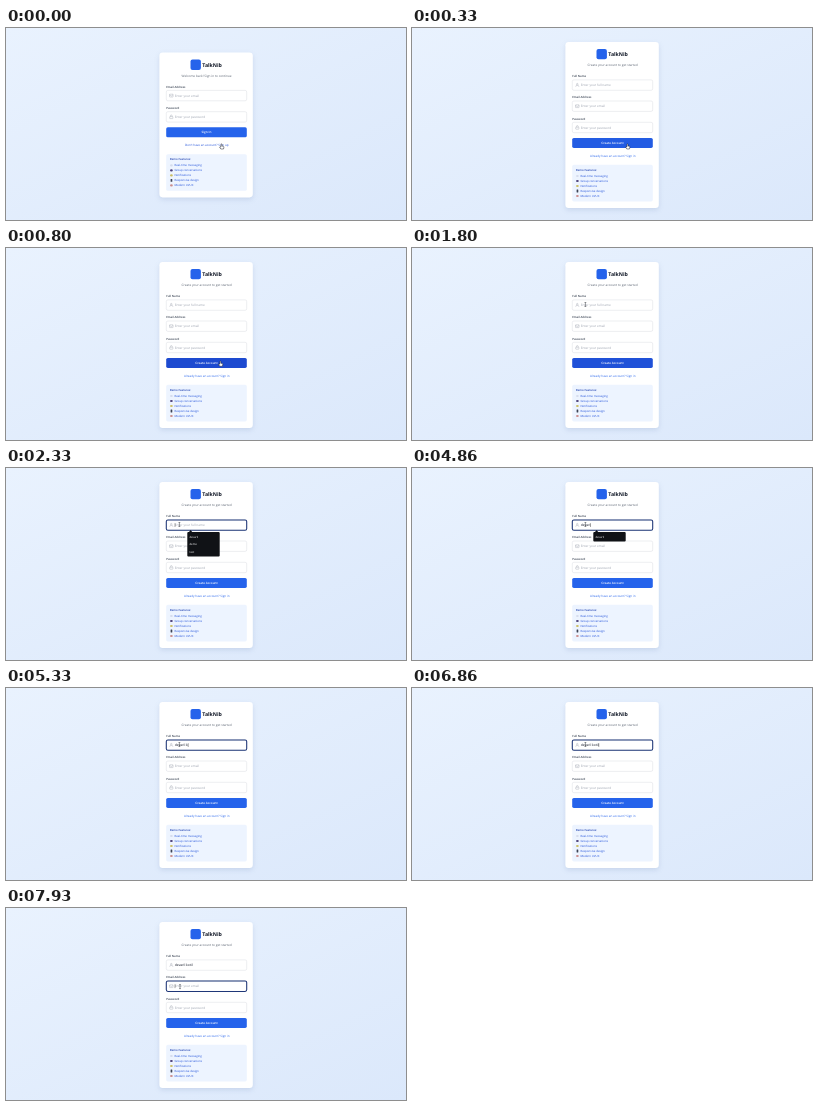
Write an HTML page that moves like this. It is 400 px wide and 192 px high and loops after 8000 ms.

```html
<!DOCTYPE html>
<html lang="en">
<head>
<meta charset="utf-8">
<title>Sign up form</title>
<style>
  html, body { margin: 0; width: 100%; height: 100%; overflow: hidden; }
  body { background: linear-gradient(to bottom right, #e9f2fe, #dbe8fb); }
  svg { display: block; width: 100vw; height: 100vh; }
  text { font-family: "Open Sans", "Noto Sans", sans-serif; text-rendering: geometricPrecision; white-space: pre; }
  .mid { text-anchor: middle; }
  .brand { font-size: 5.2px; font-weight: 700; fill: #111827; }
  .sub { font-size: 3.15px; fill: #5b6472; }
  .label { font-size: 2.85px; font-weight: 600; fill: #374151; }
  .hint { font-size: 3.15px; fill: #9ca3af; }
  .typed { font-size: 3.35px; fill: #111827; }
  .go { font-size: 3.05px; font-weight: 600; fill: #fff; }
  .link { font-size: 3px; font-weight: 500; }
  .head { font-size: 2.8px; font-weight: 600; fill: #1e40af; }
  .item { font-size: 2.85px; fill: #1d4ed8; }
  .option { font-size: 2.8px; fill: #fff; }
  .box { fill: #fff; stroke: #d1d5db; stroke-width: .4; }
  .ring { fill: none; stroke: #1f3778; stroke-width: 1.05; }
  .icon { fill: none; stroke: #9ca3af; stroke-width: .4; }
  #card { filter: drop-shadow(0 2.6px 2.6px rgba(40, 70, 130, .13)); }
</style>
</head>
<body>
<svg viewBox="0 0 400 192" preserveAspectRatio="none">
  <rect id="card" x="153.4" width="93.4" rx="3.3" fill="#fff"/>

  <g id="top">
    <rect x="184.5" y="20.9" width="10.4" height="10.4" rx="2" fill="#2563eb"/>
    <text class="brand" x="196.3" y="28.1">TalkNib</text>
    <text class="sub mid" id="sub" x="200.6" y="38"></text>
  </g>

  <g id="name"></g>

  <g id="lower">
    <g id="email"></g>
    <g id="password"></g>
    <rect id="button" x="160.2" y="109.9" width="80.6" height="10" rx="1.6"/>
    <text class="go mid" id="go" x="200.5" y="116"></text>
    <text class="link mid" id="link" x="200.8" y="128.5"></text>
    <g id="features">
      <rect x="160.2" y="136.8" width="80.6" height="36.6" rx="1.6" fill="#edf4ff"/>
      <text class="head" x="163.7" y="143.1">Demo Features:</text>
    </g>
  </g>

  <g id="popup">
    <path d="M182.6 64.4l2-2.3 2 2.3z" fill="#101216"/>
    <rect id="panel" x="181.3" y="64" width="32.4" rx="1" fill="#101216"/>
    <text class="option" x="183.4" y="69.8">devaril</text>
    <g id="more">
      <text class="option" x="183.4" y="77.3">demo</text>
      <text class="option" x="183.4" y="84.8">test</text>
    </g>
  </g>

  <g id="cursor" stroke-linejoin="round">
    <path id="hand" d="M-.5 .2Q0-.4 .5 .2V2L2 2.4Q2.5 2.6 2.4 3.2L2 5H-.7L-1.9 3.1Q-1.7 2.4-.5 3z"
          fill="#fff" stroke="#1b1d24" stroke-width=".5"/>
    <path id="beam" d="M-.9-2H.9M0-2V2M-.9 2H.9" fill="none" stroke="#33363d" stroke-width=".5"/>
    <path id="arrow" d="M0 0V4L1 3.1 1.7 4.6 2.3 4.3 1.7 2.9H3z" fill="#fff" stroke="#1b1d24" stroke-width=".4"/>
  </g>
</svg>
<script>
const $ = id => document.getElementById(id);
const LOOP = 8000, SWITCH = 260, SHIFT = 10.6;
const FULL = "devaril kotil";
// time at which each letter is typed
const KEYS = [2860, 3060, 3460, 3930, 4130, 4860, 5000, 5130, 5330, 5730, 5900, 6060, 6600];
// mouse stops: time, x, y
const PATH = [[0, 215.5, 116], [300, 215.5, 116], [750, 214.4, 113.2], [1710, 214.4, 113.2],
  [1795, 173.4, 56.5], [7240, 173.4, 56.5], [7460, 173.4, 78.2], [7900, 173.4, 78.2], [7930, 174, 78.6]];

const ICONS = {
  name: y => `<circle cx="165.3" cy="${y - .9}" r=".8"/><path d="M163.8 ${y + 1.7}v-.4q0-1 1-1h1q1 0 1 1v.4"/>`,
  email: y => `<rect x="163.5" y="${y - 1.4}" width="3.6" height="2.8" rx=".4"/><path d="M163.5 ${y - .8}l1.8 1.2 1.8-1.2"/>`,
  password: y => `<rect x="163.7" y="${y - .3}" width="3.2" height="2" rx=".4"/><path d="M164.4 ${y - .3}v-.7a.9.9 0 0 1 1.8 0v.7"/>`
};

function field(id, label, hint, y) {
  const frame = `x="160.3" y="${y - 5.2}" width="80.4" height="10.4" rx="1.6"`;
  $(id).innerHTML = `<text class="label" x="160.2" y="${y - 7.9}">${label}</text>
    <rect class="box" ${frame}/><rect class="ring" ${frame} opacity="0"/>
    <g class="icon">${ICONS[id](y)}</g>
    <text class="hint" x="168.8" y="${y + 1.1}">${hint}</text>
    <text class="typed" x="168.8" y="${y + 1.1}"></text>
    <rect class="caret" x="168.8" y="${y - 1.9}" width=".4" height="3.8" fill="#222" opacity="0"/>`;
}
field("name", "Full Name", "Enter your full name", 57.1);
field("email", "Email Address", "Enter your email", 78.2);
field("password", "Password", "Enter your password", 99.5);

const FEATURES = [
  ["Real-time messaging", "#d5dcec"], ["Group conversations", "#4a3f78"], ["Notifications", "#cbbd62"],
  ["Responsive design", "#3d4354"], ["Modern UI/UX", "#cc8d8d"]
];
$("features").innerHTML += FEATURES.map(([label, color], i) => {
  const y = 148 + i * 5;
  const shape = i === 3
    ? `<rect x="164.6" y="${y - 1.4}" width="1.7" height="2.8" rx=".3" fill="${color}"/>`
    : `<ellipse cx="165.4" cy="${y}" rx="1.4" ry="1.1" fill="${color}"/>`;
  return `${shape}<text class="item" x="168.4" y="${y + 1}">${label}</text>`;
}).join("");

const clamp = v => Math.max(0, Math.min(1, v));
const ramp = (t, from, ms) => { const p = clamp((t - from) / ms); return p * p * (3 - 2 * p); };
const show = (id, on) => $(id).setAttribute("visibility", on ? "visible" : "hidden");
const part = (id, cls) => document.querySelector(`#${id} .${cls}`);
const mix = (a, b, p) => `rgb(${a.map((v, i) => Math.round(v + (b[i] - v) * p))})`;

function mouse(t) {
  const i = Math.max(0, PATH.findLastIndex(stop => stop[0] <= t));
  const a = PATH[i], b = PATH[i + 1] || a;
  const p = ramp(t, a[0], b[0] - a[0] || 1);
  return [a[1] + (b[1] - a[1]) * p, a[2] + (b[2] - a[2]) * p];
}

function drawForm(t) {
  const joined = t >= SWITCH, inset = joined ? 0 : SHIFT;
  $("card").setAttribute("y", 14 + inset);
  $("card").setAttribute("height", 166 - 2 * inset);
  $("top").setAttribute("transform", `translate(0 ${inset})`);
  $("lower").setAttribute("transform", `translate(0 ${-inset})`);
  $("name").style.display = joined ? "" : "none";
  $("sub").textContent = joined ? "Create your account to get started" : "Welcome back! Sign in to continue";
  $("go").textContent = joined ? "Create Account" : "Sign In";
  $("link").textContent = joined ? "Already have an account? Sign in" : "Don't have an account? Sign up";
  $("link").setAttribute("fill", joined ? "#2563eb" : "#1d4ed8");
  const hover = ramp(t, SWITCH, 200) - ramp(t, 1730, 200);
  $("button").setAttribute("fill", mix([37, 99, 235], [29, 74, 208], hover));
}

function drawInput(t) {
  const text = FULL.slice(0, KEYS.filter(k => k <= t).length);
  const typed = part("name", "typed"), caret = part("name", "caret");
  typed.textContent = text;
  part("name", "hint").setAttribute("opacity", text ? 0 : 1);
  caret.setAttribute("x", 168.8 + (text ? typed.getComputedTextLength() : 0));
  caret.setAttribute("opacity", t >= 1960 && t < 7460 ? 1 : 0);
  part("email", "caret").setAttribute("opacity", t >= 7460 ? 1 : 0);
  const leave = ramp(t, 7460, 200);
  part("name", "ring").setAttribute("opacity", ramp(t, 1930, 150) - leave);
  part("email", "ring").setAttribute("opacity", leave);

  const wide = t < KEYS[0];
  $("popup").setAttribute("opacity", ramp(t, 2170, 100));
  show("popup", t >= 2200 && t < 5330);
  $("more").style.display = wide ? "" : "none";
  $("panel").setAttribute("height", wide ? 24.6 : 9.4);
}

function drawCursor(t) {
  const [x, y] = mouse(t);
  $("cursor").setAttribute("transform", `translate(${x} ${y})`);
  const hand = t < 1725;
  const beam = !hand && (Math.abs(y - 57.1) < 5.2 || Math.abs(y - 78.2) < 5.2);
  show("hand", hand);
  show("beam", beam);
  show("arrow", !hand && !beam);
}

const start = performance.now();
function render() {
  const t = (performance.now() - start) % LOOP;
  drawForm(t);
  drawInput(t);
  drawCursor(t);
  requestAnimationFrame(render);
}
render();
</script>
</body>
</html>
```
